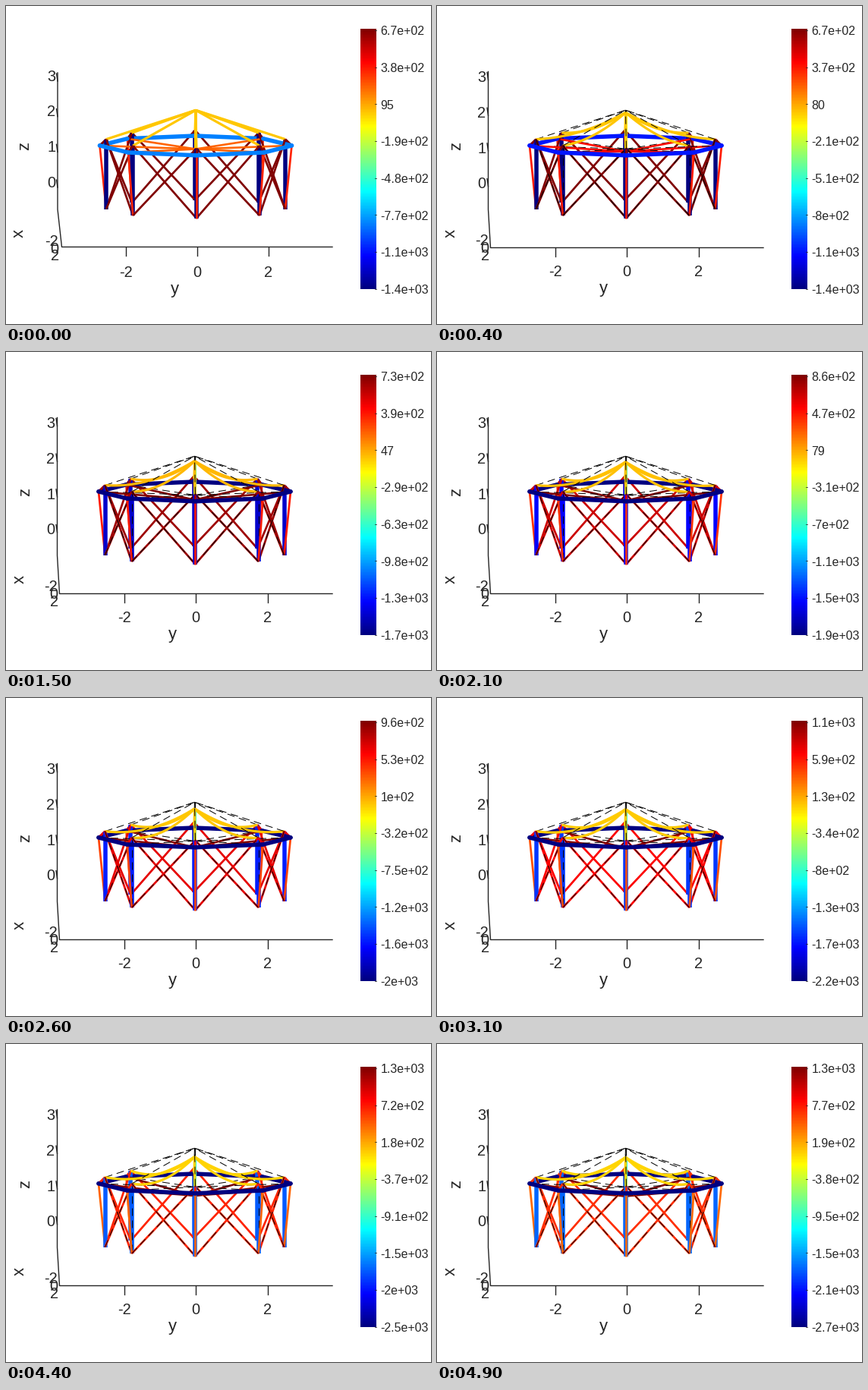
A matplotlib script that plays this animation: 560x419 px, repeating every 5 s.

```python
import numpy as np
import matplotlib.pyplot as plt
from matplotlib.animation import FuncAnimation

W, H, DPI = 560, 419, 100
FRAMES, INTERVAL = 50, 100
PX = 72 / DPI
INK = "#262626"

plt.rcParams["font.family"] = "Liberation Sans"
fig = plt.figure(figsize=(W / 100, H / 100), dpi=DPI, facecolor="white")
ax = fig.add_axes([0, 0, 1, 1])

# Member forces at a few load steps
STEPS = [0, 8, 15, 21, 31, 39, 49]
FORCES = {
    "ring": [-845, -1325, -1657, -1871, -2194, -2408, -2663.5],
    "lower": [222, 553, 728.6, 859, 1054, 1183, 1337],
    "mast": [10, -280, -470, -650, -850, -1010, -1180],
    "upper": [25, 0, 0, 0, 0, 0, 0],
    "brace": [674, 659, 657, 655, 655, 655, 655],
}
WIDTHS = {"lower": 2.6, "brace": 2.7, "post": 5.5, "leg": 2.7,
          "link": 3, "ring": 5.5, "upper": 3.2, "mast": 4}
DASHED = ("lower", "brace", "post", "upper", "mast")
ANGLES = np.arange(8) * np.pi / 4
CENTER = 249.7


def jet(f):
    return tuple(np.clip(1.5 - abs(4 * f - c), 0, 1) for c in (3, 2, 1))


def circle(radius, y):
    """Eight (x, y, depth) nodes of a flat circle seen from slightly above."""
    return [(CENTER + radius * np.sin(a) + 0.9 * np.cos(a),
             y + 0.102 * radius * np.cos(a), radius * np.cos(a))
            for a in ANGLES]


def sagging(start, end, sag):
    t = np.linspace(0, 1, 24)[:, None]
    pts = np.array(start) * (1 - t) + np.array(end) * t
    pts[:, 1] += 4 * sag * (t * (1 - t))[:, 0]
    return pts


def members(drop, sag):
    tops, bases, ring = circle(118, 175.6), circle(118, 267.6), circle(126.5, 183.9)
    apex, foot = (CENTER, 137.3 + drop, 1), (CENTER, 188.5 + drop, 1)
    after = lambda nodes: nodes[1:] + nodes[:1]
    return {
        "lower": [(n, foot) for n in ring],
        "brace": list(zip(bases, after(tops))) + list(zip(tops, after(bases))),
        "post": list(zip(tops, bases)),
        "leg": list(zip(ring, bases)),
        "link": list(zip(ring, tops)),
        "ring": list(zip(ring, after(ring))),
        "upper": [sagging(n, apex, sag) for n in tops],
        "mast": [(apex, foot)],
    }


def forces(k):
    f = {name: np.interp(k, STEPS, v) for name, v in FORCES.items()}
    f.update(post=-1352 - 8.5 * k, leg=350 + 1.5 * k, link=f["brace"])
    return f


def line(pts, color=INK, width=1.4, **kw):
    pts = np.array(pts, float)
    ax.plot(pts[:, 0], pts[:, 1], color=color, lw=width * PX, **kw)


def label(x, y, text, size=20, ha="center"):
    ax.text(x, y + 0.345 * size, text, size=size * PX, color=INK,
            ha=ha, va="baseline")


def draw_axes(first):
    x0, y0, top = (68, 317.5, 88) if first else (67.5, 318.5, 86.5)
    shift = 0 if first else -1.2
    line([(x0, top), (x0, 268), (x0 + (5.5 if first else 3), y0), (430, y0)])
    for x, text in ((157.5, "-2"), (251.5, "0"), (346, "2")):
        line([(x + shift, y0), (x + shift, y0 + 11.5)])
        label(x + shift, 350 if first else 349, text)
    for i in range(4):
        y = top + 46.7 * i
        line([(x0 - 1.5, y + 1), (x0, y + 11)])
        label(60 + shift, (91.7 if first else 93.2) + 46.7 * i, str(3 - i))
    for x, y, text in ((60, 309, "-2"), (64, 319, "0"), (65, 328.5, "2")):
        label(x + shift, y + shift / 2, text)
    ax.text(222 if first else 219, 379 if first else 378, "y",
            size=22 * PX, color=INK, ha="center", va="baseline")
    for x, y, text in ((35, 184, "z"), (28, 299.5, "x")):
        ax.text(x - shift, y, text, size=22 * PX, color=INK,
                rotation=90, ha="right", va="center")


def draw_colorbar(low, high):
    shades = np.array([[jet(f)] for f in np.linspace(1, 0, 256)])
    ax.imshow(shades, extent=(467, 488, 373.5, 31), aspect="auto",
              interpolation="nearest")
    for i, value in enumerate(np.linspace(high, low, 8)):
        y = 32 + i * 340.5 / 7
        line([(485.5, y), (488, y)], width=0.8)
        label(493.5, y + 0.8, f"{value:.2g}", 16, "left")


def draw_structure(k, force, low, high):
    load = k / (FRAMES - 1)
    dx = 0.3 if k == 0 else -1.2
    drop, sag = 12 * load ** 0.55, 12.5 * load ** 0.2
    items = []
    for name, segments in members(drop, sag).items():
        style = dict(color=jet((force[name] - low) / (high - low)),
                     width=WIDTHS[name], solid_capstyle="round" if name == "ring" else "butt")
        nearest = np.max if name == "ring" else np.mean
        items += [(nearest(np.array(s)[:, 2]), s, style) for s in segments]
    if k:
        # The unloaded shape lies slightly outside the loaded one
        style = dict(color="black", width=1, ls=(0, (10, 6)))
        rest = members(0, 0)
        items += [(1.02 * np.mean(np.array(s)[:, 2]) - 0.01, s, style)
                  for name in DASHED for s in rest[name]]
    for _, pts, style in sorted(items, key=lambda item: item[0]):
        line(np.array(pts) + (dx, 0, 0), **style)


def draw(k):
    ax.cla()
    ax.axis("off")
    force = forces(k)
    low, high = min(force.values()), max(force.values())
    draw_colorbar(low, high)
    draw_axes(k == 0)
    draw_structure(k, force, low, high)
    ax.set_xlim(0, W)
    ax.set_ylim(H, 0)
    return []


anim = FuncAnimation(fig, draw, frames=FRAMES, interval=INTERVAL,
                     init_func=lambda: [], repeat=True, repeat_delay=0, blit=False)
plt.show()
```
